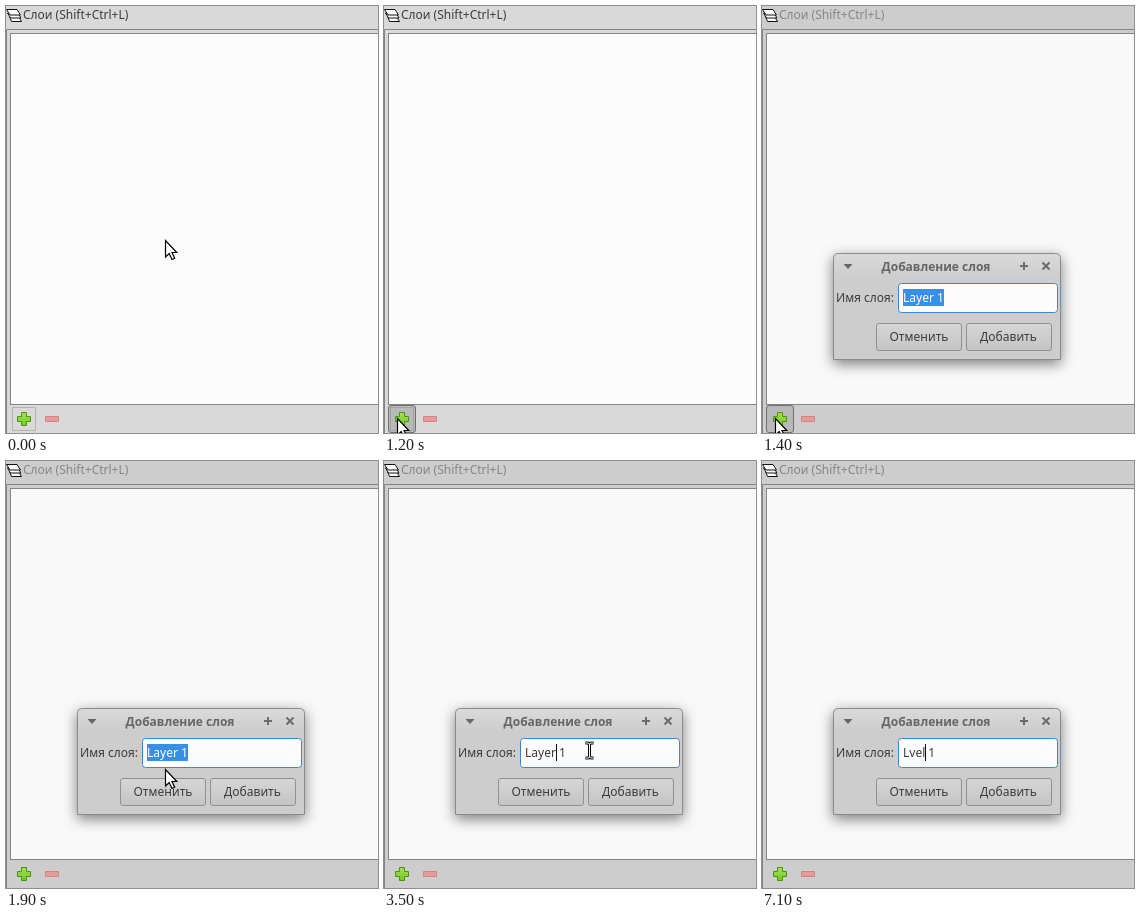
Recreate the animation shown at these times as an HTML page. Size 372 by 427 pixels, loop 8 s.

```html
<!DOCTYPE html>
<html lang="ru">
<meta charset="utf-8">
<title>Слои</title>
<style>
  html, body { margin: 0; width: 100%; height: 100%; overflow: hidden; }
  svg { display: block; font: 12px "Noto Sans", sans-serif; --bg: #d9d9d9; --list: #fcfcfc; --title: #3c3c3c; }
  svg.inactive { --bg: #cdcdcd; --list: #f9f9f9; --title: #868686; }
  text { fill: #3c3c3c; white-space: pre; }
  .mid { text-anchor: middle; }
  #dialog { filter: drop-shadow(0 4px 7px rgba(0, 0, 0, .5)); }
</style>
<svg id="stage" width="372" height="427" viewBox="0 0 372 427">
  <defs>
    <linearGradient id="bar" x2="0" y2="1">
      <stop stop-color="#dadada"/><stop offset=".22" stop-color="#cdcdcd"/>
    </linearGradient>
    <linearGradient id="raised" x2="0" y2="1">
      <stop stop-color="#d6d6d6"/><stop offset="1" stop-color="#c4c4c4"/>
    </linearGradient>
    <linearGradient id="green" x2="0" y2="1">
      <stop stop-color="#a5e05a"/><stop offset="1" stop-color="#73c81e"/>
    </linearGradient>
  </defs>

  <rect width="372" height="427" fill="var(--bg)"/>
  <g fill="#fff" stroke="#111">
    <path d="M3.5 10.5h9l3 5h-10z"/><path d="M1.5 7h10.500l3 5H4.500z"/><path d="M.5 3.500h10.500l3.500 5.500H4z"/>
  </g>
  <text x="17" y="13" style="fill:var(--title)">Слои (Shift+Ctrl+L)</text>
  <path d="M372 23.500H.5V427" fill="none" stroke="#858585"/>
  <rect x="4.500" y="27.500" width="380" height="371" fill="var(--list)" stroke="#858585"/>

  <rect id="addButton" x="4.500" y="399.500" width="27" height="27" rx="2.500"/>
  <rect id="focus" x="6.500" y="401.500" width="23" height="23" fill="none" stroke="#8c8c8c" stroke-dasharray="1 1"/>
  <path d="M15.500 406.500h5v4h4v5h-4v4h-5v-4h-4v-5h4z" fill="url(#green)" stroke="#4c9310"/>
  <path d="M39.500 410.500h13v5h-13z" fill="#e79c9c" stroke="#d28383"/>

  <g id="dialog">
    <path d="M71.500 353.500v-101q0-5 5-5h217q5 0 5 5v101z" fill="url(#bar)" stroke="#8a8a8a"/>
    <path d="M81.500 258h9l-4.500 5z" fill="#666"/>
    <path d="M258 260h8m-4-4v8M280.500 256.500l7 7m0-7l-7 7" stroke="#6c6c6c" stroke-width="2"/>
    <text class="mid" x="174" y="265" font-weight="bold" style="fill:#666">Добавление слоя</text>
    <text x="74" y="296">Имя слоя:</text>
    <rect x="136.500" y="277.500" width="159" height="29" rx="3" fill="#fcfcfc" stroke="#3787d8"/>
    <g fill="url(#raised)" stroke="#909090">
      <rect x="114.500" y="317.500" width="85" height="27" rx="2.500"/>
      <rect x="204.500" y="317.500" width="85" height="27" rx="2.500"/>
    </g>
    <text class="mid" x="157" y="335">Отменить</text>
    <text class="mid" x="246.500" y="335">Добавить</text>
    <rect id="selection" x="141" y="283" height="17" fill="#398ee7"/>
    <text id="field" x="141" y="296"><tspan></tspan><tspan fill="#fff" style="fill:#fff"></tspan><tspan></tspan></text>
    <rect id="caret" y="283" width="1" height="17" fill="#111"/>
  </g>

  <path id="arrow" d="M.5.500v16.500l3.700-3.500 2.800 6 2.700-1.200-2.700-5.800h4.800z" fill="#fff" stroke="#000" stroke-width="1.200"/>
  <g id="beam" fill="none">
    <path id="beamShape" d="M-3.500-7h2q2 0 2 2V6q0 2-2 2h-2M4.500-7h-2q-2 0-2 2V6q0 2 2 2h2" stroke="#000" stroke-width="3"/>
    <path d="M-3-7h2q1.500 0 1.500 2V6q0 2-1.500 2h-2M4-7H2q-1.500 0-1.500 2V6q0 2 1.500 2h2" stroke="#fff"/>
  </g>
</svg>
<script>
const LOOP = 8000;
const $ = id => document.getElementById(id);
const show = (id, on) => $(id).style.display = on ? '' : 'none';

// start time, text, selection start, selection end, caret hidden
const edits = [
  [0, 'Layer 1', 0, 7],
  [2300, 'Layer 1', 7, 7],
  [3200, 'Layer 1', 6, 6],
  [3500, 'Layer 1', 5, 5],
  [4700, 'Layer 1', 5, 5, true],
  [5100, 'Layer 1', 5, 5],
  [5300, 'Layer 1', 4, 5],
  [5500, 'Layer 1', 3, 5],
  [5700, 'Layer 1', 2, 5],
  [5900, 'Layer 1', 1, 5],
  [6600, 'Lv 1', 2, 2],
  [6800, 'Lve 1', 3, 3],
  [7100, 'Lvel 1', 4, 4],
];

// time, x, y of the pointer
const pointer = [
  [0, 159, 234], [800, 13, 412], [1400, 13, 412],
  [1900, 159, 308], [2200, 205, 289], [LOOP, 205, 289],
];

function pointerAt(t) {
  const i = pointer.findIndex(p => p[0] > t);
  const [t0, x0, y0] = pointer[i - 1], [t1, x1, y1] = pointer[i];
  const k = (t - t0) / (t1 - t0), ease = k * k * (3 - 2 * k);
  return [x0 + (x1 - x0) * ease, y0 + (y1 - y0) * ease].map(Math.round);
}

function drawField(t) {
  const [, text, from, to, hidden] = edits.findLast(e => e[0] <= t);
  const field = $('field');
  [text.slice(0, from), text.slice(from, to), text.slice(to)]
    .forEach((part, i) => field.children[i].textContent = part);
  const edge = n => 141 + (n ? Math.round(field.getSubStringLength(0, n)) : 0);
  $('selection').setAttribute('x', edge(from));
  $('selection').setAttribute('width', edge(to) - edge(from));
  $('caret').setAttribute('x', edge(to));
  show('caret', from === to && !hidden);
}

function drawAddButton(t, x, y) {
  const over = x < 32 && y > 399, pressed = t >= 1200;
  const button = $('addButton');
  show('addButton', over);
  button.setAttribute('fill', pressed ? '#b9b9b9' : '#e2e2e2');
  button.setAttribute('stroke', pressed ? '#707070' : '#959595');
  show('focus', t < 1300);
}

function draw(now) {
  const t = Math.floor(now % LOOP / 100) * 100;
  const [x, y] = pointerAt(t);
  const place = `translate(${x} ${y})`;
  $('arrow').setAttribute('transform', place);
  $('beam').setAttribute('transform', place);
  show('arrow', t < 2100);
  show('beam', t >= 2100 && t < 6600);
  drawAddButton(t, x, y);
  $('stage').classList.toggle('inactive', t >= 1300);
  show('dialog', t >= 1300);
  if (t >= 1300) drawField(t);
}

const start = performance.now();
(function tick() {
  draw(performance.now() - start);
  requestAnimationFrame(tick);
})();
</script>
</html>
```
